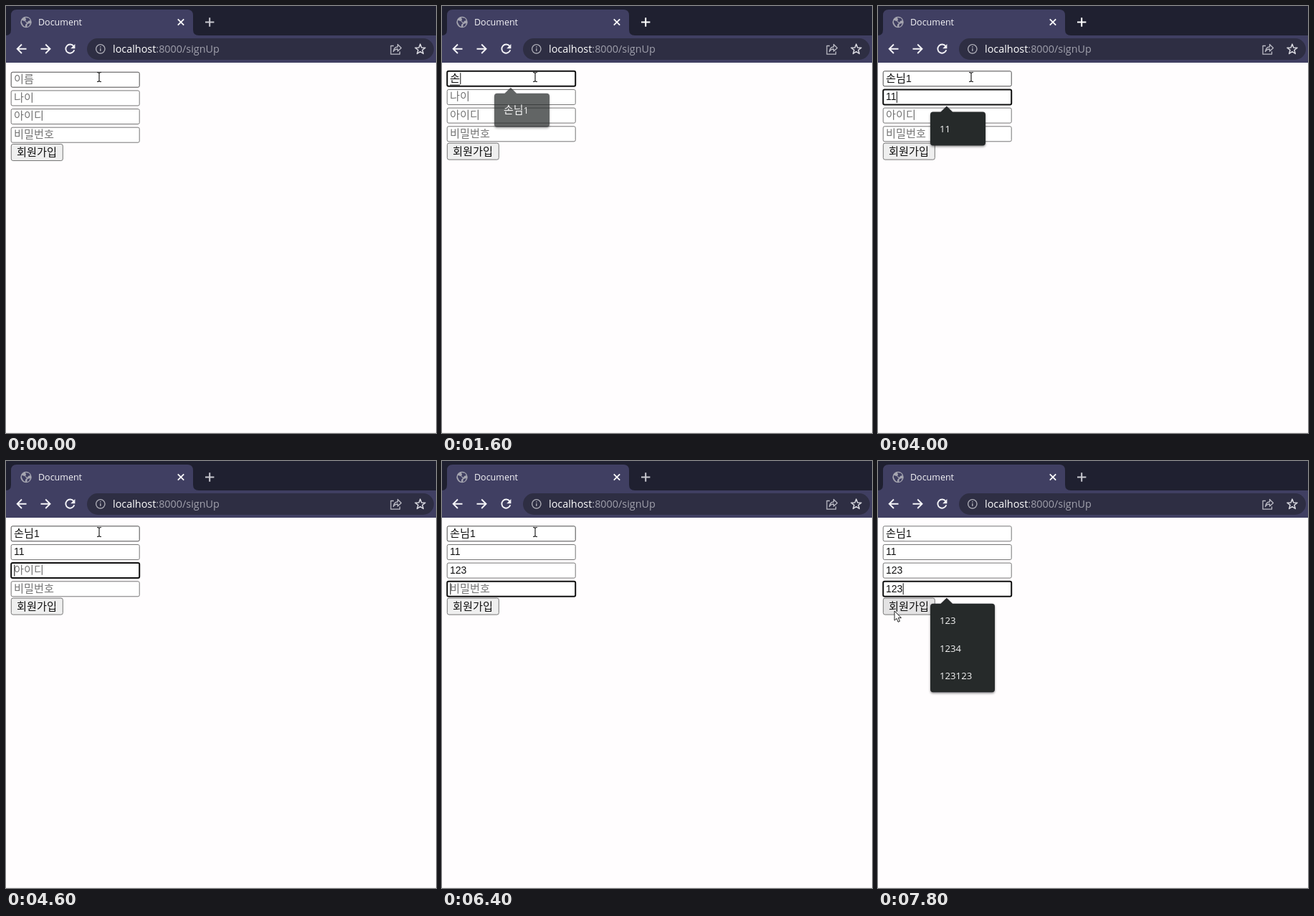
These frames come from a looping animation (600x595 px, 8 s). An HTML page:

```html
<!DOCTYPE html>
<html lang="ko">
<head>
<meta charset="utf-8">
<title>Document</title>
<style>
  html, body { margin: 0; width: 100%; height: 100%; overflow: hidden; background: #fffdfe; }
  svg { display: block; width: 600px; height: 595px; }
  text { font: 15.2px "Noto Sans CJK KR", "Noto Sans CJK", sans-serif; white-space: pre; }
  .latin { font: 14px "Liberation Sans", Arial, sans-serif; }
  .ui, .popup .latin { font-family: "Open Sans", "Noto Sans", sans-serif; }
  .popup text { font-size: 15px; fill: #f4f4f4; }
  .popup .latin { font-size: 13.2px; }
  .line { fill: none; stroke-linecap: butt; }
</style>
</head>
<body>
<svg id="stage" viewBox="0 0 600 595">
  <defs>
    <filter id="shadow" x="-20%" y="-20%" width="140%" height="150%">
      <feDropShadow dx="0" dy="1.5" stdDeviation="1.6" flood-opacity=".45"/>
    </filter>
  </defs>
  <rect width="600" height="595" fill="#fffdfe"/>
  <rect y="594" width="600" height="1" fill="#f3f1f2"/>

  <!-- browser frame -->
  <rect width="600" height="42" fill="#1f2030"/>
  <path d="M0 41Q7 41 7 33V13Q7 5 15 5H253Q261 5 261 13V33Q261 41 269 41H600V79H0Z" fill="#403f62"/>
  <rect x="113" y="45" width="484" height="30" rx="15" fill="#2e2e43"/>
  <circle cx="28" cy="22.5" r="7.7" fill="#a5a5b0"/>
  <path d="M22 20l4 1 3 3-2 2v3l-3-2-2-4ZM27 16l5 1 2 3-3 1-1 2-3-2 1-2ZM30 25l4-1-2 4-3 1Z" fill="#403f62"/>
  <text class="ui" x="45" y="27" fill="#f5f5f8" style="font-size:12.5px">Document</text>
  <path class="line" d="M239.8 18.3l8.4 8.4M248.2 18.3l-8.4 8.4" stroke="#fff" stroke-width="1.8"/>
  <path id="plus" class="line" d="M278 22.5h12.4M284.2 16.3v12.4" stroke-width="2"/>
  <g class="line" stroke="#f4f4f8" stroke-width="1.9">
    <path d="M28.5 59.8H16M22 53.5L15.7 59.8 22 66"/>
    <path d="M48.5 59.8H61M55.2 53.5l6.3 6.3L55.2 66"/>
    <path d="M94.4 56A6.1 6.1 0 1 0 95.3 61.3"/>
  </g>
  <path d="M96.4 53v6.2h-6.2Z" fill="#f4f4f8"/>
  <g class="line" stroke="#aaaab4" stroke-width="1.4">
    <circle cx="131.8" cy="59.8" r="6.2"/>
    <path d="M131.8 59v4M131.8 56.2v1.6"/>
  </g>
  <text class="ui" x="149" y="65" fill="#a0a0ac" style="font-size:14.4px"><tspan fill="#fff">localhost</tspan>:8000/signUp</text>
  <g class="line" stroke="#b9b9c3" stroke-width="1.3" stroke-linejoin="round">
    <path d="M541 55.5h-4V67.2h12.5V63.5M540.5 63.5Q541.5 57 546.5 57V53.5L551.5 58.5 546.5 63V60Q542.5 60 540.5 63.5Z"/>
    <path id="star" stroke="#d8d8df" stroke-width="1.5"/>
  </g>

  <g id="form">
    <g id="fields"></g>
    <rect id="button" x="7.3" y="192.5" width="72" height="23" rx="2.5" stroke="#767676"/>
    <text x="15" y="209.4" fill="#111">회원가입</text>
    <rect id="caret" width="1" height="16" fill="#111"/>
    <rect id="underline" x="11" y="111" width="14" height="1" fill="#111"/>
  </g>
  <g id="popup" class="popup"></g>
  <path id="ibeam" class="line" d="M-3-6.5Q0-6.5 0-5Q0-6.5 3-6.5M0-5.5V5.5M-3 6.5Q0 6.5 0 5Q0 6.5 3 6.5" stroke="#222" stroke-width="1.2"/>
  <path id="arrow" d="M0 0V13.2L3 10.4 5 15.3 7.4 14.3 5.3 9.6H9.4Z" fill="#fff" stroke="#222" stroke-width="1"/>
</svg>

<script>
const LOOP = 8000;
const hints = ['이름', '나이', '아이디', '비밀번호'];
const fieldTops = [92, 117.7, 143.3, 169];
const names = ['토리봄', '나들솔', '1', '11', '손님1'];
const ids = ['123', '1234', '123123'];

// Each row changes the state left by the rows before it.
const steps = [
  { t: 0, focus: -1, values: ['', '', '', ''], items: [], width: 77, alpha: 1, shift: 0,
    caret: true, composing: false, bright: false, mouse: [130, 99], arrow: false, hover: 0 },
  { t: 400, focus: 0 },
  { t: 800, items: names, bright: true },
  { t: 1000, caret: false },
  { t: 1400, values: ['소', '', '', ''], items: ['손님1'], shift: -1.4, caret: true, composing: true },
  { t: 1600, values: ['손', '', '', ''], alpha: .72 },
  { t: 1800, values: ['손니', '', '', ''], items: [] },
  { t: 2000, values: ['손님', '', '', ''], items: ['손님1'], alpha: 1 },
  { t: 2400, values: ['손님1', '', '', ''], composing: false },
  { t: 3000, alpha: .83 },
  { t: 3200, items: [], alpha: 1 },
  { t: 3400, focus: 1 },
  { t: 3800, values: ['손님1', '1', '', ''], items: ['1', '11'] },
  { t: 4000, values: ['손님1', '11', '', ''], items: ['11'] },
  { t: 4400, items: [], bright: false },
  { t: 4600, focus: 2 },
  { t: 5200, values: ['손님1', '11', '1', ''], items: ids, width: 90 },
  { t: 5400, values: ['손님1', '11', '12', ''] },
  { t: 5600, values: ['손님1', '11', '123', ''] },
  { t: 6200, items: [], focus: 3 },
  { t: 6600, values: ['손님1', '11', '123', '1'], items: ['1', ...ids] },
  { t: 6800, values: ['손님1', '11', '123', '12'], items: ids },
  { t: 7000, values: ['손님1', '11', '123', '123'] },
  { t: 7400, mouse: [107, 128], hover: 1 },
  { t: 7600, mouse: [47, 183], hover: 3 },
  { t: 7800, mouse: [23, 209], arrow: true, hover: 4 }
];
let last = {};
const states = steps.map(step => last = { ...last, ...step });

const $ = id => document.getElementById(id);

function add(parent, tag, attrs = {}) {
  const node = document.createElementNS('http://www.w3.org/2000/svg', tag);
  set(node, attrs);
  return parent.appendChild(node);
}

function set(node, attrs) {
  for (const key in attrs) node.setAttribute(key, attrs[key]);
}

// Latin runs use a different face from Hangul.
function write(node, string) {
  node.replaceChildren();
  for (const run of string.split(/([\x21-\x7e]+)/).filter(Boolean)) {
    add(node, 'tspan', /[\x21-\x7e]/.test(run) ? { class: 'latin' } : {}).textContent = run;
  }
}

const fields = fieldTops.map(top => ({
  box: add($('fields'), 'rect', { x: 7.2, y: top + .2, width: 179, height: 21, rx: 2, fill: '#fff' }),
  text: add($('fields'), 'text', { x: 11, y: top + 15 })
}));

const starPoints = Array.from({ length: 10 }, (_, i) => {
  const angle = i * Math.PI / 5 - Math.PI / 2;
  const radius = i % 2 ? 3.1 : 7.4;
  return `${578 + radius * Math.cos(angle)} ${60.5 + radius * Math.sin(angle)}`;
});
set($('star'), { d: `M${starPoints.join('L')}Z` });

function drawPopup({ items, width, alpha, focus, shift }) {
  const popup = $('popup');
  popup.replaceChildren();
  if (!items.length) return;
  const top = fieldTops[focus] + shift + 31.2;
  const bottom = top + items.length * 38.2 + 8.8;
  const right = 73 + width;
  set(popup, { opacity: alpha });
  add(popup, 'path', {
    d: `M77 ${top}H87.5L95.8 ${top - 8}L104 ${top}H${right - 4}Q${right} ${top} ${right} ${top + 4}` +
       `V${bottom - 4}Q${right} ${bottom} ${right - 4} ${bottom}H77Q73 ${bottom} 73 ${bottom - 4}` +
       `V${top + 4}Q73 ${top} 77 ${top}Z`,
    fill: '#28292c', filter: 'url(#shadow)'
  });
  items.forEach((item, i) => write(add(popup, 'text', { x: 86, y: top + 28.6 + i * 38.2 }), item));
}

function draw(state) {
  const { focus, values, shift, mouse, hover } = state;
  set($('form'), { transform: `translate(0 ${shift})` });
  fields.forEach(({ box, text }, i) => {
    const active = i === focus;
    set(box, {
      stroke: active ? '#101010' : i === hover ? '#4c4c4c' : '#767676',
      'stroke-width': active ? 2 : 1
    });
    write(text, values[i] || hints[i]);
    set(text, { fill: values[i] ? '#111' : '#757575' });
  });
  set($('button'), { fill: hover === 4 ? '#e4e3e4' : '#efefef' });
  set($('plus'), { stroke: state.bright ? '#fff' : '#c9c9d0' });

  const typed = values[focus] ? fields[focus].text.getComputedTextLength() : 0;
  set($('caret'), {
    x: 11.3 + typed,
    y: (fieldTops[focus] || 0) + 2.6,
    visibility: focus >= 0 && state.caret ? 'visible' : 'hidden'
  });
  set($('underline'), { width: typed, visibility: state.composing ? 'visible' : 'hidden' });
  drawPopup(state);

  for (const id of ['ibeam', 'arrow']) {
    set($(id), {
      transform: `translate(${mouse})`,
      visibility: (id === 'arrow') === state.arrow ? 'visible' : 'hidden'
    });
  }
}

let shown;
function tick() {
  const time = performance.now() % LOOP;
  const state = states.findLast(s => s.t <= time);
  if (state !== shown) draw(shown = state);
  requestAnimationFrame(tick);
}
tick();
</script>
</body>
</html>
```
